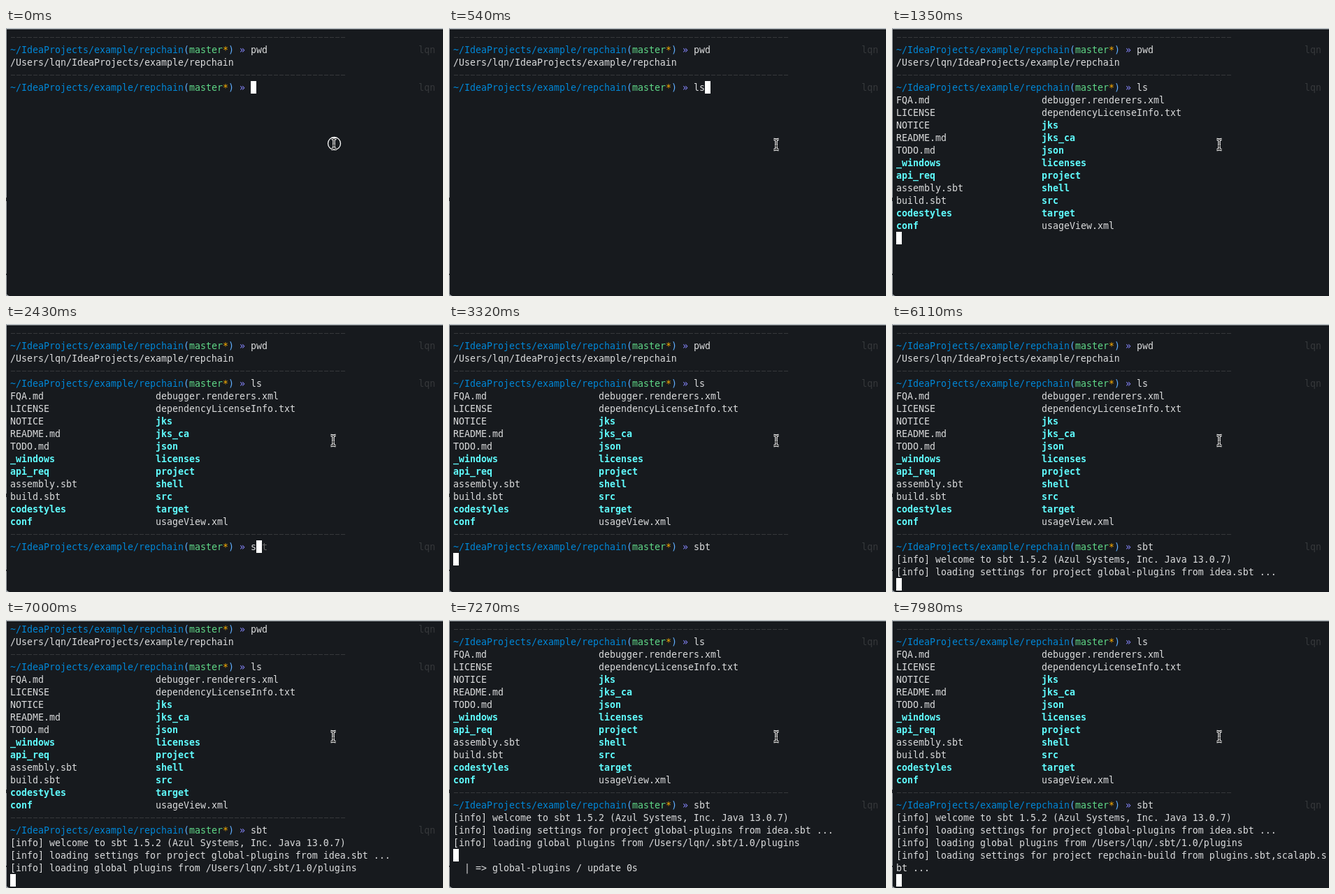
An HTML page with a canvas for the animation above (8 s loop, 625x384 px).

```html
<!DOCTYPE html>
<html lang="en">
<head>
<meta charset="utf-8">
<title>Terminal</title>
<style>
html, body { margin: 0; width: 100%; height: 100%; overflow: hidden; background: #171a1e; }
canvas { display: block; }
</style>
</head>
<body>
<canvas id="stage" width="625" height="384"></canvas>
<script>
const ctx = document.getElementById('stage').getContext('2d');
const LOOP = 8000, CW = 8, LH = 18, LEFT = 6, TOP = 4;
const BG = '#171a1e', FG = '#dadbdc', DIM = '#36383b', CYAN = '#60fdff';
const USER = 'lqn';

function rect(x, y, w, h, color) {
  ctx.fillStyle = color;
  ctx.fillRect(x, y, w, h);
}

function put(col, row, text, color = FG, bold = false) {
  ctx.font = (bold ? 'bold ' : '') + '13.29px "DejaVu Sans Mono", monospace';
  ctx.fillStyle = color;
  ctx.fillText(text, LEFT + col * CW, TOP + row * LH + 14);
}

// Each line is a function that draws itself on a given row.
const plain = text => row => put(0, row, text);

const rule = row => {
  for (let i = 0; i < 60; i++) rect(LEFT + i * CW + 1, TOP + row * LH + 9, 6, 1, DIM);
};

const prompt = (cmd, ghost = '') => row => {
  const parts = [
    ['~/IdeaProjects/example/repchain', '#0087d7'], ['(', '#5fafff'], ['master', '#5fd787'],
    ['*', '#ffaf00'], [')', '#5fafff'], [' » ', '#8787ff'], [cmd, FG], [ghost, '#666']
  ];
  let col = 0;
  for (const [text, color] of parts) {
    put(col, row, text, color);
    col += text.length;
  }
  put(73, row, USER, DIM);
};

const left = 'FQA.md LICENSE NOTICE README.md TODO.md _windows/ api_req/ assembly.sbt build.sbt codestyles/ conf/'.split(' ');
const right = 'debugger.renderers.xml dependencyLicenseInfo.txt jks/ jks_ca/ json/ licenses/ project/ shell/ src/ target/ usageView.xml'.split(' ');

function entry(col, row, name) {
  const dir = name.endsWith('/');
  put(col, row, name.replace('/', ''), dir ? CYAN : FG, dir);
}

const files = left.map((name, i) => row => {
  entry(0, row, name);
  entry(26, row, right[i]);
});

const head = [rule, prompt('pwd'), plain(`/Users/${USER}/IdeaProjects/example/repchain`), rule];
const listed = [...head, prompt('ls'), ...files];
const sbt = (cmd, ghost) => [...listed, rule, prompt(cmd, ghost)];
const log = [
  '[info] welcome to sbt 1.5.2 (Azul Systems, Inc. Java 13.0.7)',
  '[info] loading settings for project global-plugins from idea.sbt ...',
  `[info] loading global plugins from /Users/${USER}/.sbt/1.0/plugins`,
  '[info] loading settings for project repchain-build from plugins.sbt,scalapb.s',
  'bt ...'
].map(plain);
const logged = n => [...sbt('sbt'), ...log.slice(0, n)];
const blank = () => {};

// Start time, lines, cursor column, cursor line, lines scrolled off the top.
const scenes = [
  [0, [...head, prompt('')], 43, 4, 0],
  [450, [...head, prompt('l')], 44, 4, 0],
  [540, [...head, prompt('ls')], 45, 4, 0],
  [1350, listed, 0, 16, 0],
  [1440, sbt(''), 43, 17, 0],
  [2430, sbt('s', 'bt'), 44, 17, 0],
  [2600, sbt('sb', 't'), 45, 17, 0],
  [2870, sbt('sbt'), 46, 17, 0],
  [3320, sbt('sbt'), 0, 18, 0],
  [5480, logged(1), 0, 19, 0],
  [6110, logged(2), 0, 20, 0],
  [7000, logged(3), 0, 21, 1],
  [7270, [...logged(3), blank, plain('  | => global-plugins / update 0s')], 0, 21, 3],
  [7810, logged(3), 0, 21, 3],
  [7900, logged(5), 0, 23, 3]
];

function pointer(ring) {
  ctx.save();
  ctx.translate(ring ? 469 : 468, ring ? 166 : 167);
  if (ring) {
    ctx.beginPath();
    ctx.arc(0.5, -0.5, 9, 0, Math.PI * 2);
    ctx.strokeStyle = '#fff';
    ctx.lineWidth = 1.3;
    ctx.stroke();
  }
  const beam = new Path2D('M-3.5-7.5Q0-7.5 0-5.5Q0-7.5 3.5-7.5M0-5.5V5.5M-3.5 7.5Q0 7.5 0 5.5Q0 7.5 3.5 7.5M-2 2H2');
  for (const [width, color] of [[3.4, '#fff'], [1.2, '#111']]) {
    ctx.lineWidth = width;
    ctx.strokeStyle = color;
    ctx.stroke(beam);
  }
  ctx.restore();
}

function windowEdge() {
  rect(0, 0, 625, 1, '#c3c9cc');
  rect(0, 1, 625, 1, '#8d9296');
  rect(0, 0, 1, 384, '#a4a9ad');
  rect(0, 243, 1, 5, '#33363a');
  rect(0, 352, 1, 2, '#33363a');
  ctx.fillStyle = '#a4a9ad';
  ctx.fill(new Path2D('M0 379Q1 383 5 384H0Z'));
}

function draw(now) {
  const t = now % LOOP;
  const [, lines, col, line, scroll] = scenes.findLast(s => s[0] <= t);
  rect(0, 0, 625, 384, BG);
  lines.slice(scroll).forEach((drawLine, row) => drawLine(row));
  rect(LEFT + col * CW, TOP + (line - scroll) * LH, CW, LH, '#fff');
  windowEdge();
  pointer(t < 90);
}

let start;
function tick(now) {
  start ??= now;
  draw(now - start);
  requestAnimationFrame(tick);
}
requestAnimationFrame(tick);
</script>
</body>
</html>
```
